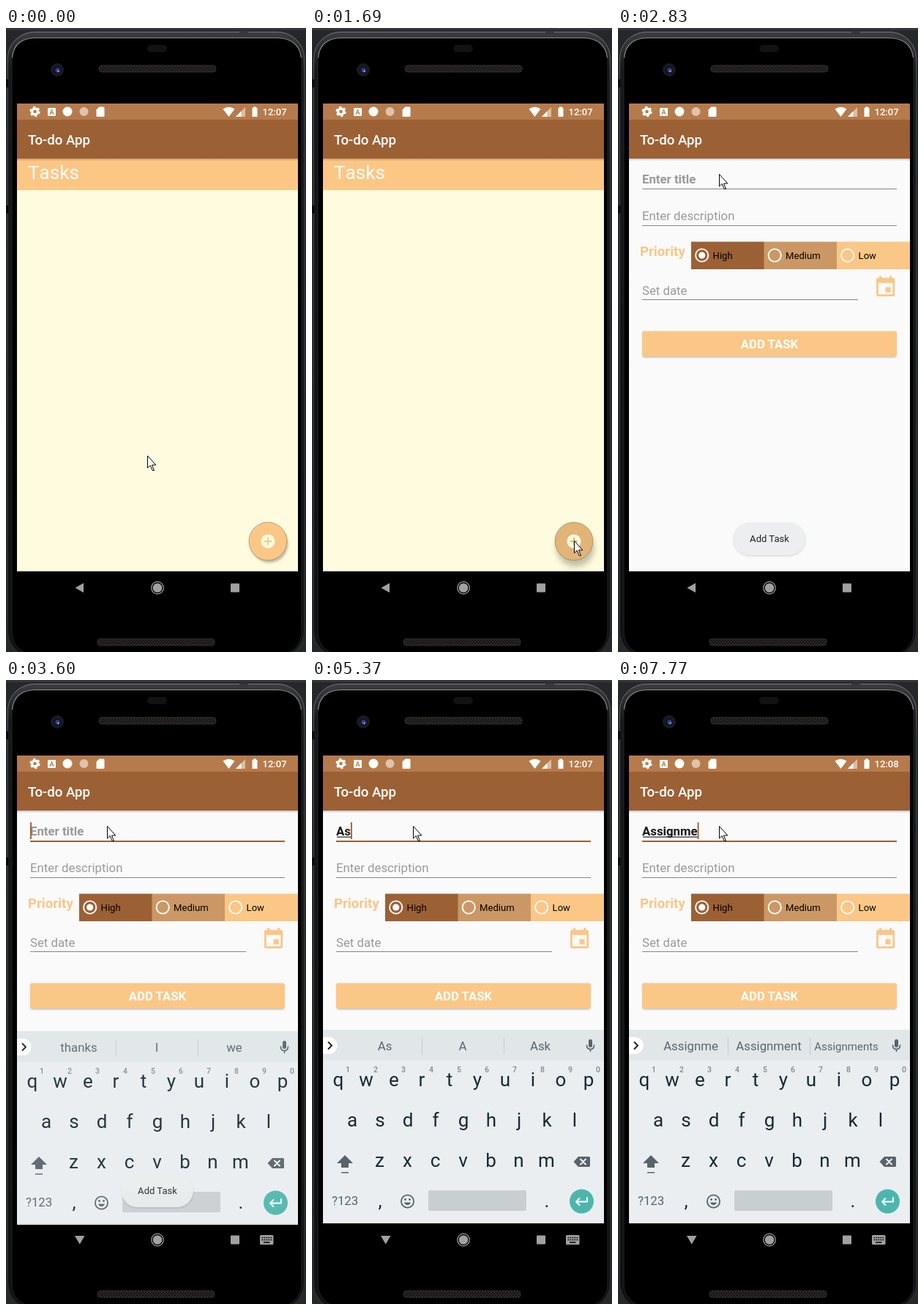
Animation, 410 px wide and 851 px high, one loop 8000 ms. Source, as an HTML page:

```html
<!DOCTYPE html>
<html lang="en">
<head>
<meta charset="utf-8">
<title>To-do App</title>
<style>
  html, body { margin: 0; width: 100%; height: 100%; overflow: hidden; background: #000; }
  svg { display: block; width: 100%; height: 100%; font-family: Roboto, sans-serif; font-size: 16.8px; }
  .bold { font-weight: 700; }
  .mid { text-anchor: middle; }
  .hint { fill: #9a9a9a; }
  .line { fill: none; stroke-linecap: round; stroke-linejoin: round; }
  .key { font-size: 26px; fill: #152b34; text-anchor: middle; }
  .digit { font-size: 10.5px; font-weight: 500; fill: #7c888f; text-anchor: middle; }
  .word { fill: #59676e; text-anchor: middle; }
</style>
</head>
<body>
<svg viewBox="0 0 410 851">
  <defs>
    <clipPath id="screenClip"><rect x="15" y="103" width="384" height="640"/></clipPath>
    <filter id="soft" x="-50%" y="-50%" width="200%" height="200%"><feGaussianBlur stdDeviation="1.7"/></filter>
    <filter id="softer" x="-50%" y="-50%" width="200%" height="200%"><feGaussianBlur stdDeviation="4"/></filter>
    <linearGradient id="rim" x2="0" y2="1">
      <stop stop-color="#77787a"/><stop offset=".08" stop-color="#434446"/><stop offset="1" stop-color="#2a2b2d"/>
    </linearGradient>
    <linearGradient id="edge" x2="0" y2="1">
      <stop stop-color="#3c3d3f"/><stop offset=".06" stop-color="#17181a"/><stop offset="1" stop-color="#101112"/>
    </linearGradient>
    <linearGradient id="drop" x2="0" y2="1">
      <stop stop-color="#000" stop-opacity=".22"/><stop offset="1" stop-color="#000" stop-opacity="0"/>
    </linearGradient>
    <pattern id="mesh" width="4" height="4" patternUnits="userSpaceOnUse">
      <rect width="4" height="4" fill="#2d2a27"/><path d="M0 0l4 4M4 0l-4 4" stroke="#141312"/>
    </pattern>
    <rect id="speaker" width="160" height="9" rx="4" fill="url(#mesh)" stroke="#353230"/>
  </defs>

  <!-- Phone body -->
  <rect width="410" height="851" fill="#25272b"/>
  <rect width="410" height="3" fill="#33363c"/>
  <rect x="2.5" y="5.5" width="405" height="853" rx="36" fill="url(#edge)" stroke="url(#rim)"/>
  <rect x="8" y="13.5" width="396" height="841" rx="30" fill="#000" stroke="#232426"/>
  <path class="line" d="M8.500 40Q11 14 40 13.500H370Q400 14 403.500 40" stroke="#8b8c8e" stroke-width="1.2"/>
  <path d="M319 4h12v5h-12z" fill="#35373a"/>
  <path d="M0 70h3v11H0zM0 242h3v11H0z" fill="#08090a"/>
  <rect x="193" y="23" width="27" height="10" rx="5" fill="#121213"/>
  <circle cx="70" cy="57" r="9" fill="#1b1b1e"/>
  <circle cx="70" cy="57" r="5.5" fill="#11142c"/>
  <circle cx="70.5" cy="57.5" r="3" fill="#34418a"/>
  <circle cx="71.5" cy="59" r="1.2" fill="#98a5ec"/>
  <use href="#speaker" x="127" y="51"/>
  <use href="#speaker" x="125" y="833"/>

  <g clip-path="url(#screenClip)">
    <!-- Task list -->
    <g id="list">
      <rect x="15" y="178" width="384" height="563" fill="#fffbde"/>
      <rect x="15" y="178" width="384" height="43" fill="#fcc785"/>
      <text x="30" y="206" font-size="26.1" fill="#fff" style="font-kerning: none">Tasks</text>
      <circle id="fabShadow" cx="360" r="25.5"/>
      <circle id="fab" cx="358" cy="700" r="26" stroke="#7d6746" stroke-width=".5"/>
      <circle cx="358" cy="700" r="9.5" fill="#fffbde"/>
      <path id="plus" class="line" d="M353.500 700h9M358 695.500v9" stroke-width="1.9"/>
    </g>

    <!-- Task form -->
    <g id="form">
      <rect x="15" y="178" width="384" height="563" fill="#fafafa"/>
      <text id="titleHint" class="bold hint" x="33" y="212">Enter title</text>
      <text id="title" class="bold" x="33" y="212" fill="#181818"></text>
      <rect id="titleUnder" x="34" y="213.5" height="1.2" fill="#222"/>
      <rect x="33" y="219" width="348" height="1" fill="#858585"/>
      <rect id="focus" x="33" y="219" width="348" height="2" fill="#9c6035"/>
      <rect id="caret" y="194" width="1.9" height="23" fill="#9c6035"/>
      <text class="hint" x="33" y="262">Enter description</text>
      <rect x="33" y="269" width="348" height="1" fill="#858585"/>
      <text class="bold" x="30" y="311" font-size="18.66" fill="#fac786">Priority</text>
      <g id="choices" font-size="13.07"></g>
      <text class="hint" x="33" y="363.5">Set date</text>
      <rect x="33" y="370" width="295" height="1" fill="#858585"/>
      <path transform="translate(348.800 336.600) scale(1.4)" fill="#fac786" d="M17 12h-5v5h5zM16 1v2H8V1H6v2H5q-2 0-2 2v14q0 2 2 2h14q2 0 2-2V5q0-2-2-2h-1V1zM19 19H5V8h14z" fill-rule="evenodd"/>
      <rect x="34" y="415" width="346" height="34" rx="2" opacity=".3" filter="url(#soft)"/>
      <rect x="33" y="413.5" width="348" height="34.5" rx="2" fill="#fac786"/>
      <text class="bold mid" x="207" y="437" fill="#fff">ADD TASK</text>
    </g>

    <rect x="15" y="178" width="384" height="3.5" fill="url(#drop)"/>

    <g id="keyboard">
      <rect x="15" y="477" width="384" height="264" fill="#eaeef1"/>
      <rect x="15" y="477" width="384" height="42" fill="#e1e6e9"/>
      <path d="M150.500 488v23M262.500 488v23" stroke="#c6ccd0"/>
      <path d="M15 487h8a11.500 11.500 0 0 1 0 23h-8z" fill="#fff"/>
      <path class="line" d="M22.500 494l4.500 4.500-4.500 4.500" stroke="#222" stroke-width="2"/>
      <g id="words"></g>
      <g fill="#56646b">
        <rect x="378" y="490" width="5" height="11" rx="2.5"/>
        <path class="line" style="stroke: #56646b" d="M375.500 498q0 5.500 5 5.500t5-5.500M380.500 503.500v3" stroke-width="1.6"/>
        <path d="M45 648l11 11h-6v6h-10v-6h-6zM40 671h10v1.500h-10z"/>
        <path d="M364 650h14.500q1.500 0 1.500 1.500v11q0 1.500-1.500 1.500h-14.500l-6.500-7z"/>
        <text x="27" y="716">?123</text>
        <circle cx="130.5" cy="711" r="8.6" fill="none" stroke="#56646b" stroke-width="1.8"/>
        <circle cx="127.5" cy="708.5" r="1.4"/><circle cx="133.5" cy="708.5" r="1.4"/>
        <path d="M126 712.500h9q-1.500 3.500-4.500 3.500t-4.500-3.500z"/>
      </g>
      <path class="line" d="M367 653.500l7 7m0-7l-7 7" stroke="#fff" stroke-width="1.8"/>
      <g id="keys"></g>
      <text class="key" x="93" y="719">,</text>
      <text class="key" x="321" y="719">.</text>
      <rect x="159" y="696" width="134" height="28" rx="2" fill="#c9ced1"/>
      <circle cx="368.5" cy="711" r="16.5" fill="#4db6ac"/>
      <path class="line" d="M376 706v5.500h-15m4.500-4.500l-4.500 4.500 4.500 4.500" stroke="#fff" stroke-width="1.9"/>
    </g>

    <g id="toast">
      <rect x="158" y="676" width="98" height="44" rx="22" opacity=".16" filter="url(#soft)"/>
      <rect x="157.5" y="674" width="98.5" height="45" rx="22.5" fill="#eceeef"/>
      <text class="mid" x="207" y="701" font-size="13.07" fill="#222">Add Task</text>
    </g>

    <!-- Status and app bars -->
    <rect x="15" y="103" width="384" height="22" fill="#b57b4c"/>
    <rect x="15" y="125" width="384" height="53" fill="#9c6035"/>
    <text x="30" y="159" font-size="18.66" font-weight="500" fill="#fff">To-do App</text>
    <g fill="#fff">
      <circle cx="39.5" cy="114" r="4" fill="none" stroke="#fff" stroke-width="3.4"/>
      <circle cx="39.5" cy="114" r="6" fill="none" stroke="#fff" stroke-width="2.4" stroke-dasharray="3.14"/>
      <rect x="57" y="109" width="11" height="11" rx="1"/>
      <text class="bold mid" x="62.5" y="118" font-size="9" fill="#b57b4c">A</text>
      <circle cx="84" cy="114" r="6.5"/>
      <circle cx="106.5" cy="114" r="6" opacity=".55"/>
      <path d="M127.500 107.500h5.500q1.500 0 1.500 1.500v10.500q0 1.500-1.500 1.500h-8q-1.500 0-1.500-1.500v-8z"/>
      <path d="M296.500 110.500q8-5.500 16 0l-8 10.500z"/>
      <path d="M327 108v13h-13z" opacity=".5"/><path d="M321.500 113.500v7.500H314z"/>
      <path d="M338 107.500h4v1.500h1.500v12h-7v-12h1.500z"/>
      <text id="clock" x="350.5" y="119" font-size="13.07" font-weight="500"></text>
    </g>
  </g>

  <!-- Navigation bar -->
  <g fill="#a1a1a1">
    <path id="back" d="M94.500 763.500l11.500-6.500v13z"/>
    <path id="down" d="M94 758h13.500l-6.750 11.500z"/>
    <circle cx="207" cy="763.5" r="6.3"/>
    <circle cx="207" cy="763.5" r="8.3" fill="none" stroke="#a1a1a1" stroke-width="1.2"/>
    <rect x="307" y="757.5" width="12" height="12" rx="1"/>
    <g id="switcher">
      <rect x="347" y="757" width="18.5" height="13" rx="1.5"/>
      <path d="M349.500 760.500h14M349.500 763.500h14" stroke="#000" stroke-width="1.6" stroke-dasharray="1.8 1.2"/>
      <path d="M352 767h8.500" stroke="#000" stroke-width="1.5"/>
    </g>
  </g>

  <path id="pointer" d="M.5 .5v16.500l3.700-3.500 3 7h2.300l-3-7.500h5.300z" fill="#fff" stroke="#000"/>
</svg>

<script>
const LOOP = 8000;
const ids = ["list", "fabShadow", "fab", "plus", "form", "titleHint", "title", "titleUnder", "focus", "caret",
  "choices", "keyboard", "words", "keys", "toast", "clock", "back", "down", "switcher", "pointer"];
const ui = Object.fromEntries(ids.map(id => [id, document.getElementById(id)]));

function set(node, attributes) {
  for (const name in attributes) node.setAttribute(name, attributes[name]);
}
function add(parent, tag, attributes, text = "") {
  const node = document.createElementNS("http://www.w3.org/2000/svg", tag);
  set(node, attributes);
  node.textContent = text;
  return parent.appendChild(node);
}
function show(node, visible) {
  node.style.display = visible ? "" : "none";
}
function write(node, text) {
  if (node.textContent !== text) node.textContent = text;
}
// Values hold until the next step: [time, ...values].
function stepAt(steps, time) {
  return steps.findLast(step => step[0] <= time).slice(1);
}

[["High", "#9c6035"], ["Medium", "#cb9865"], ["Low", "#fac786"]].forEach(([label, color], i) => {
  const x = 100 + i * 99.5;
  add(ui.choices, "rect", { x, y: 291.5, width: 100, height: 37.5, fill: color });
  add(ui.choices, "circle", { cx: x + 14.7, cy: 310, r: 8.6, fill: "none", stroke: "#fff", "stroke-width": 1.9 });
  if (!i) add(ui.choices, "circle", { cx: x + 14.7, cy: 310, r: 4.6, fill: "#fff" });
  add(ui.choices, "text", { x: x + 29.6, y: 315 }, label);
});

const keys = [];
["qwertyuiop", "asdfghjkl", "zxcvbnm"].forEach((row, r) => {
  [...row].forEach((letter, i) => {
    const x = [36, 55, 92.5][r] + i * 38;
    keys.push({ letter, node: add(ui.keys, "text", { class: "key", x, y: 554 + r * 55 }) });
    if (!r) add(ui.keys, "text", { class: "digit", x: x + 13, y: 535 }, String((i + 1) % 10));
  });
});
const words = [99.5, 206, 312].map(x => add(ui.words, "text", { class: "word", x, y: 504.5 }));

const pointerSteps = [
  [0, 193, 583], [500, 129, 535], [620, 258, 630], [740, 375, 699], [890, 358, 699],
  [2080, 340, 620], [2200, 290, 465], [2320, 220, 315], [2440, 180, 241], [2690, 146, 210], [2830, 138, 199]
];
const typingSteps = [
  [0, ""], [4970, "A"], [5370, "As"], [5620, "Ass"], [5740, "Assi"], [5990, "Assig"], [6110, "Assign"],
  [6360, "Assignm"], [6640, "Assignmn"], [6760, "Assignmne"], [6880, "Assignmnet"],
  [7380, "Assignmne"], [7530, "Assignmn"], [7650, "Assignm"], [7770, "Assignme"]
];
// Middle and right suggestions; the left one repeats the typed text.
const suggestionSteps = [
  [0, "I", "we"], [4970, "I", "At"], [5370, "A", "Ask"], [5620, "Assignment", "Assist"],
  [5740, "Assignment", "Assistance"], [5990, "Assignment", "Assignments"],
  [6880, "Assignment", "Assignment's"], [7380, "Assignment", "Assignments"]
];
const caretSteps = [[0, false], [3330, true], [3840, false], [4330, true], [4850, false], [4970, true]];
const keyboardSteps = [[0, 0, 0], [3480, 18, .7], [3600, 2, .93], [3720, 0, 1]];
const toastSteps = [[0, 0], [1930, 1], [3600, .9], [3720, .45], [3840, 0]];
const focusSteps = [[0, 0], [3210, .5], [3330, 1]];

function draw(time) {
  const onForm = time >= 1810;
  show(ui.list, !onForm);
  show(ui.form, onForm);

  const raised = time >= 1420, pressed = time >= 1690;
  set(ui.fabShadow, {
    cy: raised ? 709 : 704, opacity: raised ? .25 : .24, filter: raised ? "url(#softer)" : "url(#soft)"
  });
  const fabColor = pressed ? "#e2b478" : "#fac786";
  set(ui.fab, { fill: fabColor });
  set(ui.plus, { stroke: fabColor });

  const [typed] = stepAt(typingSteps, time);
  write(ui.title, typed);
  show(ui.titleHint, !typed);
  const width = typed && onForm ? ui.title.getComputedTextLength() : 0;
  set(ui.titleUnder, { width });
  set(ui.caret, { x: 33 + width });
  show(ui.caret, stepAt(caretSteps, time)[0]);
  set(ui.focus, { opacity: stepAt(focusSteps, time)[0] });

  const [shift, opacity] = stepAt(keyboardSteps, time);
  const keyboardOpen = opacity > 0;
  set(ui.keyboard, { transform: `translate(0 ${shift})`, opacity });
  show(ui.back, !keyboardOpen);
  show(ui.down, keyboardOpen);
  show(ui.switcher, keyboardOpen);

  const upper = time >= 4850 && time < 4970;
  for (const { letter, node } of keys) write(node, upper ? letter.toUpperCase() : letter);

  const correcting = typed.startsWith("Assignmn");
  [typed || "thanks", ...stepAt(suggestionSteps, time)].forEach((word, i) => {
    write(words[i], word);
    words[i].style.fontSize = word === "Assignments" ? "15px" : "";
    words[i].style.fontWeight = correcting && i === 1 ? 700 : 400;
  });

  set(ui.toast, { opacity: stepAt(toastSteps, time)[0] });
  write(ui.clock, time < 7380 ? "12:07" : "12:08");
  set(ui.pointer, { transform: `translate(${stepAt(pointerSteps, time).join(" ")})` });
}

const start = performance.now();
function tick() {
  draw((performance.now() - start) % LOOP);
  requestAnimationFrame(tick);
}
tick();
</script>
</body>
</html>
```
